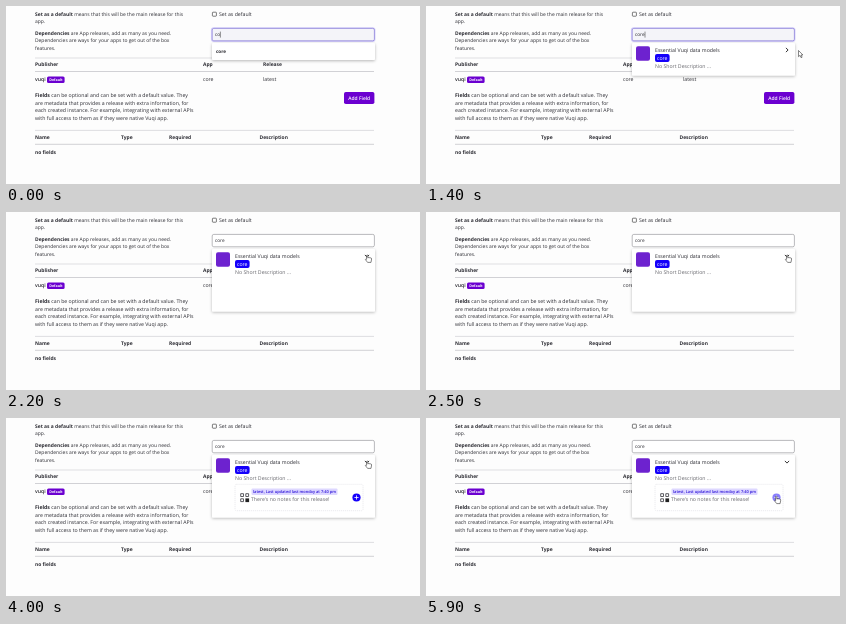
Animation, 414 px wide and 178 px high, one loop 6000 ms. Source, as an HTML page:

```html
<!DOCTYPE html>
<html lang="en">
<head>
<meta charset="utf-8">
<title>Adding a dependency</title>
<style>
  html, body { margin: 0; width: 100%; height: 100%; overflow: hidden; background: #fdfdfd; }
  svg { display: block; width: 100%; height: 100%; }
  text { font: 4.95px "Open Sans", "Noto Sans", sans-serif; fill: #2c2c33; text-rendering: geometricPrecision; }
  .bold { font-weight: 700; }
  .semibold { font-weight: 600; }
  .large { font-size: 5.2px; }
  .muted { fill: #66666c; }
  .white { fill: #fff; }
  .rule { stroke: #bfbfc4; stroke-width: .7; }
  .faint { stroke: #d2d2d6; stroke-width: .7; }
</style>
</head>
<body>
<svg viewBox="0 0 414 178">
  <defs>
    <filter id="shadow" x="-10%" y="-20%" width="120%" height="150%">
      <feDropShadow dx="0" dy="1" stdDeviation="1.5" flood-color="#000" flood-opacity=".28"/>
    </filter>
  </defs>
  <rect width="414" height="178" fill="#fdfdfd"/>

  <g id="page">
    <text x="29" y="9.8"><tspan class="bold">Set as a default</tspan> means that this will be the main release for this</text>
    <text x="29" y="17.3">app.</text>
    <text x="29" y="28.8"><tspan class="bold">Dependencies</tspan> are App releases, add as many as you need.</text>
    <text x="29" y="36.3">Dependencies are ways for your apps to get out of the box</text>
    <text x="29" y="43.8">features.</text>

    <rect x="206.4" y="6.2" width="4" height="4" rx=".6" fill="#fff" stroke="#444" stroke-width=".7"/>
    <text class="large" x="213" y="9.9">Set as default</text>

    <path class="faint" d="M29 52H368"/>
    <text class="bold" x="29" y="60">Publisher</text>
    <text class="bold" x="197" y="60">App</text>
    <text class="bold" x="257" y="60">Release</text>
    <path class="rule" d="M29 65.5H368"/>
    <text class="large semibold" x="29" y="75">vuqi</text>
    <rect x="41" y="70.5" width="17.6" height="6.4" rx="1.5" fill="#6b00d0"/>
    <text class="bold white" x="43.3" y="75" style="font-size:3.6px">Default</text>
    <text class="large" x="197" y="75">core</text>
    <text class="large" x="257" y="75">latest</text>

    <text class="large" x="29" y="91.3"><tspan class="bold">Fields</tspan> can be optional and can be set with a default value. They</text>
    <text class="large" x="29" y="98.8">are metadata that provides a release with extra information, for</text>
    <text class="large" x="29" y="106.3">each created instance. For example, integrating with external APIs</text>
    <text class="large" x="29" y="113.8">with full access to them as if they were native Vuqi app.</text>
    <rect x="338" y="86" width="30.4" height="12" rx="1.8" fill="#6b00d0"/>
    <text class="white semibold" x="342.2" y="93.8">Add Field</text>

    <path class="faint" d="M29 124.4H368"/>
    <text class="bold" x="29" y="132.8">Name</text>
    <text class="bold" x="115" y="132.8">Type</text>
    <text class="bold" x="163" y="132.8">Required</text>
    <text class="bold" x="253.5" y="132.8">Description</text>
    <path class="rule" d="M29 138.3H368"/>
    <text class="bold" x="29" y="147.8">no fields</text>
  </g>

  <rect id="focusRing" x="205.6" y="21.9" width="163.2" height="13.4" rx="2" fill="none" stroke="#d6d1fa" stroke-width="1.4"/>
  <rect id="field" x="206.2" y="22.4" width="162.2" height="12.4" rx="1.6" stroke-width=".7"/>
  <text id="typed" x="209" y="30.3" style="font-size:4.7px"></text>
  <path id="caret" stroke="#222" stroke-width=".5"/>

  <rect id="panel" x="206" y="37" width="163" rx="1.2" fill="#fff" filter="url(#shadow)"/>
  <text id="suggestion" class="bold" x="210" y="46.8" style="font-size:4.6px">core</text>

  <g id="result">
    <rect x="210" y="40.3" width="14" height="14.4" rx="2" fill="#6d22cf"/>
    <text class="large" x="229" y="45.9">Essential Vuqi data models</text>
    <rect x="229" y="48" width="14.6" height="8" rx="2" fill="#1500fa"/>
    <text class="large white" x="231" y="53.8">core</text>
    <text class="large muted" x="229" y="62.3">No Short Description ...</text>
    <path id="chevron" d="M-1.1 -2.1L1.1 0L-1.1 2.1" fill="none" stroke="#222" stroke-width=".9"/>
  </g>

  <g id="release">
    <rect x="229" y="66.3" width="128" height="26.4" rx="1.5" fill="#fff" stroke="#d9d9df" stroke-width=".5" stroke-dasharray="1.2 .8"/>
    <path d="M234.7 75.7h2.8v2.8h-2.8zM239.8 75.7h2.8v2.8h-2.8zM234.7 80.8h2.8v2.8h-2.8z" fill="#fff" stroke="#4a4a50" stroke-width=".9"/>
    <rect x="239.4" y="80.4" width="3.7" height="3.7" fill="#222"/>
    <rect x="245.5" y="70.4" width="86" height="6.6" rx="1.2" fill="#ddd7ff"/>
    <text class="semibold" x="247" y="75" style="font-size:3.95px;fill:#2a10d8">latest, Last updated last monday at 7:40 pm</text>
    <text class="large muted" x="245" y="83">There's no notes for this release!</text>
    <g id="addButton">
      <circle cx="350.5" cy="79.5" r="4.1" fill="#1500fa"/>
      <path d="M348.4 79.5h4.2M350.5 77.4v4.2" stroke="#fff" stroke-width=".8"/>
    </g>
  </g>

  <g id="cursor" fill="#fff" stroke="#222" stroke-width=".55" stroke-linejoin="round">
    <path id="arrow" d="M0 0V6.2L1.5 4.9L2.6 7.2L3.6 6.7L2.5 4.5H4.4Z"/>
    <path id="hand" d="M-.6 .5Q0 -.3 .6 .5V3L1.7 2.7L2.7 3L3.6 3.1Q4.5 3.3 4.4 4.2L3.8 7.6H.4L-1.8 4.8Q-1.6 3.8 -.6 4.5Z"/>
  </g>
</svg>
<script>
  const LOOP = 6000;
  const el = id => document.getElementById(id);
  const set = (id, attrs) => {
    for (const name in attrs) el(id).setAttribute(name, attrs[name]);
  };
  const show = (id, opacity) => set(id, { opacity: Number(opacity) });
  const progress = (t, from, to) => Math.min(1, Math.max(0, (t - from) / (to - from)));
  const ease = p => p * p * (3 - 2 * p);
  const mix = (a, b, p) => a + (b - a) * p;

  function drawField(t) {
    const focused = t < 2000;
    const text = t < 100 ? "co" : t < 300 ? "cor" : "core";
    const caretX = { co: 214.4, cor: 216.6, core: 219 }[text];
    const caretOn = t < 300 || Math.floor((t - 300) / 500) % 2 === 0;
    el("typed").textContent = text;
    set("caret", { d: `M${caretX} 25.6V31.6` });
    show("caret", focused && caretOn);
    show("focusRing", focused);
    set("field", { fill: focused ? "#f4f4f9" : "#fff", stroke: focused ? "#8175d6" : "#9c9ca1" });
  }

  function drawPanel(t) {
    const found = t >= 300;
    const open = ease(progress(t, 2000, 2200));
    set("panel", { height: found ? mix(32.5, 62.5, open) : 17 });
    show("suggestion", !found);
    show("result", found ? progress(t, 200, 400) : 0);
    set("chevron", { transform: `translate(361 44) rotate(${90 * open})` });
    show("release", progress(t, 2500, 3100));
    show("addButton", mix(1, .5, progress(t, 5700, 5850)));
  }

  function drawCursor(t) {
    const arrive = ease(progress(t, 1400, 1900));
    const leave = ease(progress(t, 5400, 5900));
    const x = mix(mix(372.5, 361.2, arrive), 350.3, leave);
    const y = mix(mix(44.5, 42.8, arrive), 78, leave);
    const overPanel = x < 369;
    set("cursor", { transform: `translate(${x} ${y})` });
    show("cursor", t >= 1400);
    show("hand", overPanel);
    show("arrow", !overPanel);
  }

  function draw(now) {
    const t = now % LOOP;
    drawField(t);
    drawPanel(t);
    drawCursor(t);
    requestAnimationFrame(() => draw(performance.now()));
  }
  draw(performance.now());
</script>
</body>
</html>
```
